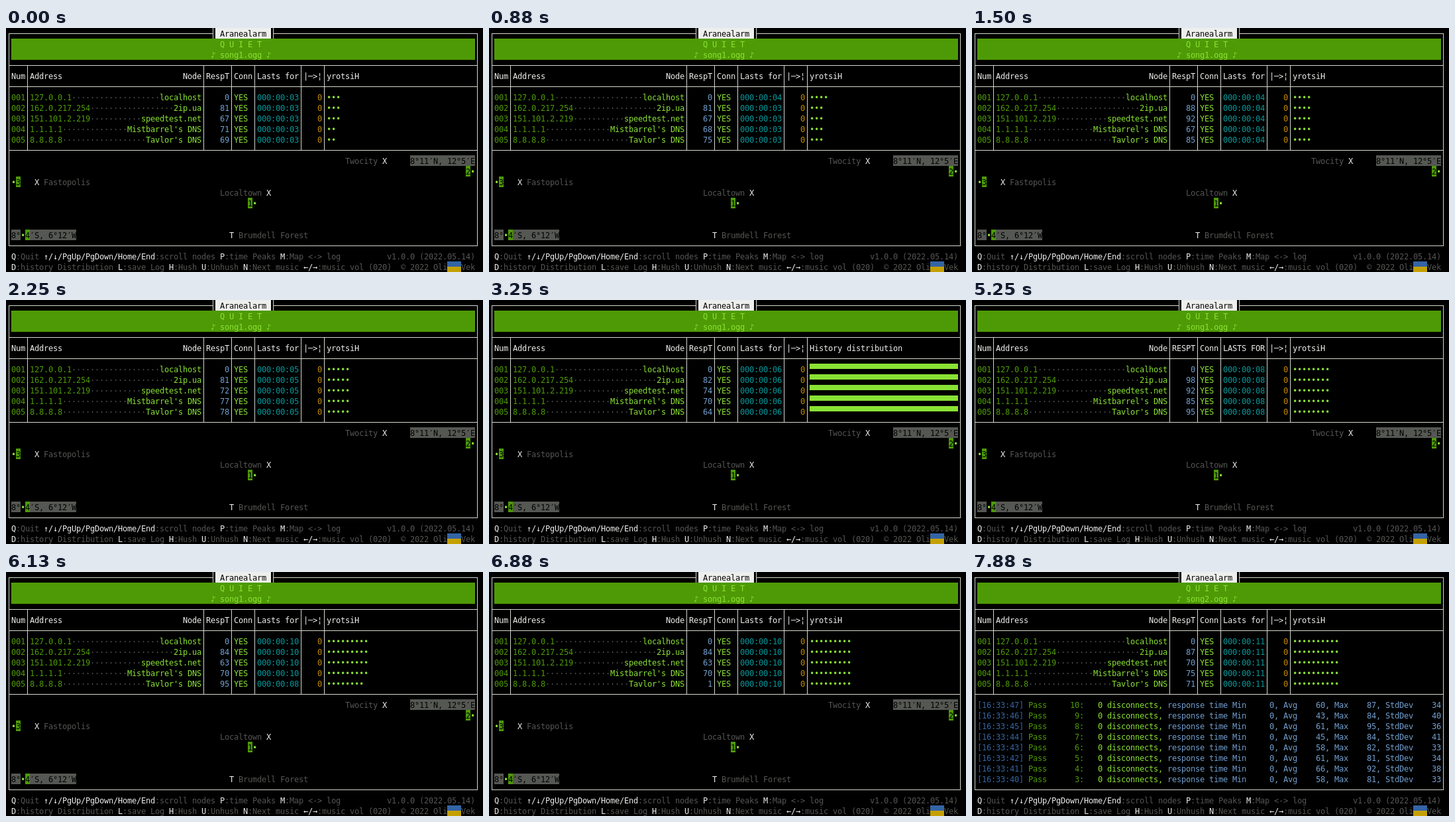
Write an HTML page with a canvas that moves like this. It is 720 px wide and 368 px high and loops after 8 s.

```html
<!DOCTYPE html>
<html lang="en">
<head>
<meta charset="utf-8">
<title>Node monitor</title>
<style>
  html, body { margin: 0; width: 100%; height: 100%; overflow: hidden; background: #000; }
  canvas { display: block; }
</style>
</head>
<body>
<canvas id="screen" width="720" height="368"></canvas>
<script>
const ctx = document.getElementById('screen').getContext('2d');
const LOOP = 8000, CELL = 7, ROW = 16;
const WHITE = '#eeeeec', GRAY = '#555753', GREEN = '#4e9a06', LIME = '#8ae234',
      SKY = '#729fcf', BLUE = '#3465a4', TEAL = '#06989a', AMBER = '#c48a00', LINE = '#d3d7cf';

const nodes = [
  ['127.0.0.1', 'localhost'],
  ['162.0.217.254', '2ip.ua'],
  ['151.101.2.219', 'speedtest.net'],
  ['1.1.1.1', "Mistbarrel's DNS"],
  ['8.8.8.8', "Tavlor's DNS"]
];
// Response times and uptime seconds of each pass, starting with FIRST
const FIRST = 2, LAST = 10;
const pings = [
  [0, 80, 70, 71, 69], [0, 81, 67, 68, 75], [0, 88, 92, 67, 85],
  [0, 81, 72, 77, 78], [0, 82, 74, 70, 64], [0, 1, 84, 76, 67],
  [0, 75, 72, 64, 95], [0, 84, 63, 70, 1], [0, 87, 70, 75, 71]
];
const uptime = [3, 3, 4, 5, 6, 7, 8, 10, 11];
const peaks = [0, 98, 92, 85, 95];

const colX = col => 1 + CELL * col;
const within = (t, from, to) => t >= from && t < to;

// Nodes are polled one after another within each pass
function passOf(row, t) {
  const n = 4 + Math.floor((t - 860 - row * 69) / 1010);
  return Math.min(LAST, Math.max(FIRST, n));
}

function fill(col, row, cells, color, top = 0, height = ROW) {
  ctx.fillStyle = color;
  ctx.fillRect(colX(col), row * ROW + top, cells * CELL, height);
}

function text(col, row, str, color) {
  ctx.fillStyle = color;
  for (const ch of str) {
    if (ch !== ' ') ctx.fillText(ch, colX(col) + CELL / 2, row * ROW + 13);
    col++;
  }
  return col;
}

function textRight(endCol, row, str, color) {
  text(endCol - str.length, row, str, color);
}

function hline(row, from = 0, to = 101) {
  ctx.fillStyle = LINE;
  ctx.fillRect(colX(from) + 3, row * ROW + 8, (to - from) * CELL + 1, 1);
}

function vline(col, y0, y1) {
  ctx.fillStyle = LINE;
  ctx.fillRect(colX(col) + 3, y0, 1, y1 - y0);
}

function drawFrame() {
  hline(0, 0, 44);
  hline(0, 57, 101);
  [3, 5, 11, 20].forEach(row => hline(row));
  [0, 101].forEach(col => vline(col, 8, 329));
  [44, 57].forEach(col => vline(col, 0, ROW));
  [4, 42, 48, 53, 63, 68].forEach(col => vline(col, 56, 185));
}

function drawBanner(song) {
  fill(45, 0, 12, WHITE);
  text(46, 0, 'Aranealarm', '#000');
  fill(1, 1, 100, GREEN, 0, 2 * ROW);
  text(46, 1, 'Q U I E T', LIME);
  text(44, 2, `♪ song${song}.ogg ♪`, LIME);
}

function drawTable(t, showPeaks, showBars) {
  text(1, 4, 'Num', WHITE);
  text(5, 4, 'Address', WHITE);
  text(38, 4, 'Node', WHITE);
  text(43, 4, showPeaks ? 'RESPT' : 'RespT', WHITE);
  text(49, 4, 'Conn', WHITE);
  text(54, 4, showPeaks ? 'LASTS FOR' : 'Lasts for', WHITE);
  text(64, 4, '|─>¦', WHITE);
  text(69, 4, showBars ? 'History distribution' : 'yrotsiH', WHITE);

  nodes.forEach(([address, name], i) => {
    const row = 6 + i, pass = passOf(i, t), k = pass - FIRST;
    const start = text(5, row, address, GREEN);
    text(1, row, '00' + (i + 1), GREEN);
    text(start, row, '·'.repeat(42 - name.length - start), GRAY);
    textRight(42, row, name, LIME);
    textRight(48, row, String(showPeaks ? peaks[i] : pings[k][i]), SKY);
    text(49, row, 'YES', LIME);
    text(54, row, '000:00:' + String(uptime[k]).padStart(2, '0'), TEAL);
    text(67, row, '0', AMBER);
    if (showBars) fill(69, row, 32, LIME, 0, 8);
    else text(69, row, '•'.repeat(pass), LIME);
  });
}

function marker(col, row, digit, dotCol) {
  fill(col, row, 1, GREEN);
  text(col, row, digit, '#000');
  text(dotCol, row, '•', LIME);
}

function place(col, row, name, markCol, mark) {
  text(col, row, name, GRAY);
  text(markCol, row, mark, WHITE);
}

function drawMap() {
  place(73, 12, 'Twocity', 81, 'X');
  place(8, 14, 'Fastopolis', 6, 'X');
  place(46, 15, 'Localtown', 56, 'X');
  place(50, 19, 'Brumdell Forest', 48, 'T');

  fill(87, 12, 14, GRAY);
  text(87, 12, '8°11′N, 12°5′E', '#000');
  fill(1, 19, 14, GRAY);
  text(1, 19, '8°  ′S, 6°12′W', '#000');
  fill(3, 19, 1, '#000');

  marker(99, 13, '2', 100);
  marker(2, 14, '3', 1);
  marker(52, 16, '1', 53);
  marker(4, 19, '4', 3);
}

function drawLog(t) {
  const newest = passOf(4, t);
  for (let i = 0; i < 8; i++) {
    const pass = newest - i, row = 12 + i, values = pings[pass - FIRST];
    if (!values) break;
    const mean = values.reduce((a, b) => a + b) / values.length;
    const variance = values.reduce((s, v) => s + (v - mean) ** 2, 0) / (values.length - 1);
    const num = v => String(Math.floor(v)).padStart(6);
    text(1, row, `[16:33:${37 + pass}]`, BLUE);
    text(12, row, 'Pass' + num(pass).padStart(7) + ':', GREEN);
    text(27, row, '0 disconnects,', LIME);
    text(42, row, `response time Min${num(0)}, Avg${num(mean)}, Max${num(Math.max(...values))}, StdDev${num(Math.sqrt(variance))}`, SKY);
  }
}

// Alternates key (white) and description (gray)
function keys(row, parts) {
  let col = 1;
  parts.forEach((part, i) => { col = text(col, row, part, i % 2 ? GRAY : WHITE); });
}

function drawFooter() {
  keys(21, ['Q', ':Quit ', '↑/↓/PgUp/PgDown/Home/End', ':scroll nodes ',
            'P', ':time Peaks ', 'M', ':Map <-> log']);
  textRight(101, 21, 'v1.0.0 (2022.05.14)', GRAY);
  keys(22, ['D', ':history Distribution ', 'L', ':save Log ', 'H', ':Hush ',
            'U', ':Unhush ', 'N', ':Next music ', '←/→', ':music vol (020)']);
  text(85, 22, '© 2022 Oli', GRAY);
  fill(95, 22, 3, BLUE, 0, 8);
  fill(95, 22, 3, '#c4a000', 8, 8);
  text(98, 22, 'Vek', GRAY);
}

function draw(t) {
  ctx.fillStyle = '#000';
  ctx.fillRect(0, 0, 720, 368);
  ctx.font = '12px "DejaVu Sans Mono", monospace';
  ctx.textAlign = 'center';
  drawFrame();
  drawBanner(t < 7500 ? 1 : 2);
  drawTable(t, within(t, 4880, 5880), within(t, 2620, 3750));
  if (t < 7000) drawMap();
  else drawLog(t);
  drawFooter();
}

function tick() {
  draw(performance.now() % LOOP);
  requestAnimationFrame(tick);
}
tick();
</script>
</body>
</html>
```
